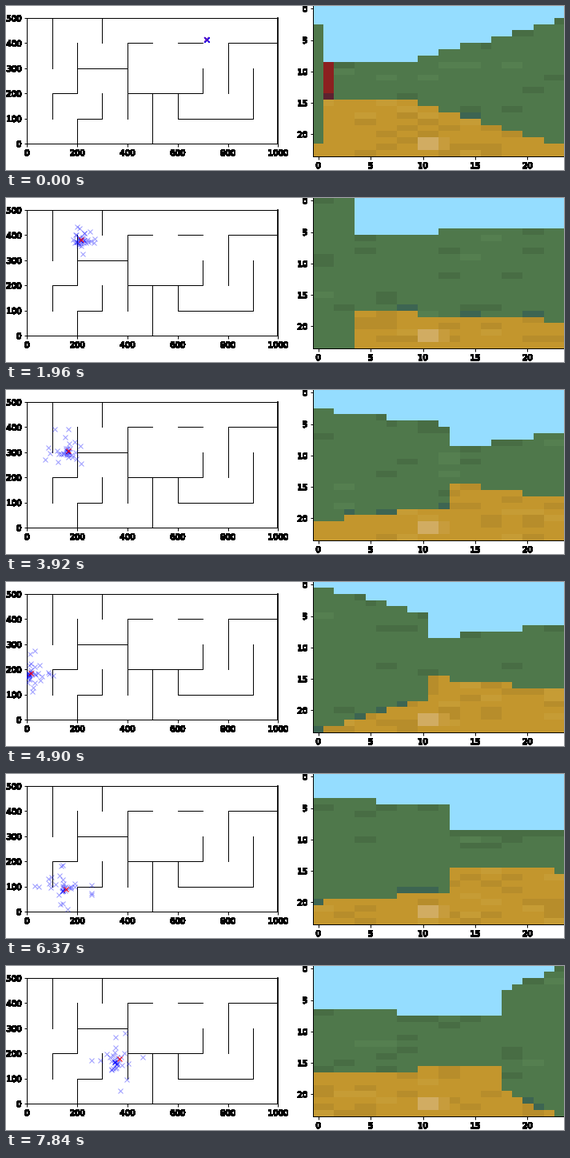
A matplotlib script that plays this animation: 698x205 px, repeating every 8 s.

```python
import numpy as np
import matplotlib.pyplot as plt
from matplotlib.animation import FuncAnimation
from matplotlib.patheffects import withStroke

W, H, DPI = 698, 205, 72
FRAMES, INTERVAL, STEP_MS = 200, 40, 490
STEPS = 17
N = 24  # camera resolution
PARTICLES = 30

SKY, WALL, FLOOR = "#95ddff", "#4f784b", "#c3962d"
WALL_DARK, WALL_LIGHT, TEAL = "#486d44", "#557f50", "#3d6552"
FLOOR_DARK, FLOOR_LIGHT, GLOW = "#b78d2b", "#c69c35", "#d1ac62"
POST, POST_FOOT = "#8c2020", "#5c2230"

# Key poses: step, x, y, column of the wall corner,
# sky height at both ends of the left wall, then of the right wall.
POSES = np.array([
    (0, 714, 414, 8, 10, 10, 9.3, 2.2),
    (4, 215, 381, 4, -2, -2, 6.1, 4.6),
    (6, 137, 442, 15, 3.9, 14.3, 6.3, -6),
    (8, 165, 305, 13, 3.2, 5.6, 9.3, 6.8),
    (10, 16, 186, 11, 0.7, 5.2, 8.95, 7),
    (13, 155, 90, 13, 3.6, 5.45, 9.2, 8.7),
    (16, 368, 177, 18, 7, 8.2, 3.9, 0.2),
])

# Maze walls: start cell corner and unit moves (Up, Down, Left, Right)
ROUTES = [((1, 5), "DD"), ((3, 5), "D"), ((2, 4), "DDLD"), ((2, 3), "RR"),
          ((5, 4), "LDDD"), ((6, 4), "R"), ((4, 2), "RRRU"), ((5, 2), "DD"),
          ((6, 2), "DRRRUU"), ((8, 2), "UURR"), ((2, 0), "URU")]
MOVES = {"U": (0, 1), "D": (0, -1), "L": (-1, 0), "R": (1, 0)}

plt.rcParams.update({
    "font.family": "DejaVu Sans", "font.size": 10, "text.antialiased": False,
    "axes.linewidth": 1, "xtick.major.width": 1, "ytick.major.width": 1,
})


def rgb(color):
    return np.array(plt.matplotlib.colors.to_rgb(color))


def pose_at(step):
    return [np.interp(step, POSES[:, 0], col) for col in POSES[:, 1:].T]


def render_view(corner, left, right, rng):
    """Two walls meeting at a corner column, between sky and floor."""
    sky = np.concatenate([np.linspace(*left, corner),
                          np.linspace(*right, N - corner)])
    sky = np.minimum(sky, 9.4)  # far end of the corridor
    top = np.clip(np.rint(sky), 0, N)
    bottom = np.clip(np.rint(24.2 - sky), 0, N)
    row = np.arange(N)[:, None]
    is_wall = (row >= top) & (row < bottom)
    is_floor = row >= bottom
    grain = np.repeat(rng.random((N, N // 2)), 2, axis=1)

    img = np.tile(rgb(SKY), (N, N, 1))
    layers = [
        (is_wall, WALL),
        (is_wall & (grain < 0.06), WALL_DARK),
        (is_wall & (grain > 0.97), WALL_LIGHT),
        (is_wall & (row == top) & (grain < 0.45), WALL_DARK),
        (is_wall & (row == bottom - 1) & (row > 16) & (grain < 0.35), TEAL),
        (is_floor, FLOOR),
        (is_floor & (grain < 0.2), FLOOR_DARK),
        (is_floor & (grain > 0.9), FLOOR_LIGHT),
    ]
    for mask, color in layers:
        img[mask] = rgb(color)
    img[21:23, 10:12] = rgb(GLOW)
    img[21:23, 12] = 0.7 * rgb(FLOOR) + 0.3 * rgb(GLOW)
    return img


def make_step(k):
    """Robot position, its estimate, the particle cloud and the camera view."""
    rng = np.random.default_rng(40 + k)
    x, y, corner, *heights = pose_at(k)
    drift = 0.07 * k**2
    guess = np.array([max(x - drift, 5), y - 0.6 * drift])
    offsets = rng.laplace(scale=0.7, size=(PARTICLES, 2)).clip(-2.6, 2.6)
    cloud = np.abs(guess + 12 * np.sqrt(k) * offsets)
    view = render_view(round(corner), heights[:2], heights[2:], rng)
    return (x, y), guess, cloud, view


steps = [make_step(k) for k in range(STEPS)]

# The starting view holds a near wall edge and a red post beside it.
first = steps[0][3]
first[3:22, 0] = rgb(WALL)
first[9:14, 1] = rgb(POST)
first[14, 1] = rgb(POST_FOOT)

fig = plt.figure(figsize=(W / DPI, H / DPI), dpi=DPI, facecolor="white")


def pixel_axes(left, top, width, height):
    return fig.add_axes([left / W, 1 - (top + height) / H, width / W, height / H])


def heavy_labels(ax):
    for label in ax.get_xticklabels() + ax.get_yticklabels():
        label.set_path_effects([withStroke(linewidth=0.7, foreground="black")])


maze = pixel_axes(26.25, 15, 314.1, 157)
maze.set(xlim=(0, 1000), ylim=(0, 500),
         xticks=range(0, 1001, 200), yticks=range(0, 501, 100))
maze.spines["right"].set_linewidth(1.8)

for start, moves in ROUTES:
    corners = 100 * np.cumsum([start] + [MOVES[m] for m in moves], axis=0)
    maze.plot(*corners.T, "k", lw=1)


def crosses(color, **kw):
    return maze.plot([], [], "x", color=color, ms=6, mew=1, **kw)[0]


cloud_marks = crosses("blue", alpha=0.4, zorder=3)
guess_mark = crosses("blue", zorder=4)
robot_mark = crosses("red", zorder=5)

camera = pixel_axes(384.1, -0.6, 314.1, 188.4)
picture = camera.imshow(first, aspect="auto", interpolation="nearest")
camera.set(xticks=range(0, 21, 5), yticks=range(0, 21, 5))

heavy_labels(maze)
heavy_labels(camera)


def draw(i):
    k = min((i * INTERVAL + INTERVAL // 2) // STEP_MS, STEPS - 1)
    robot, guess, cloud, view = steps[k]
    cloud_marks.set_data(*cloud.T)
    guess_mark.set_data(*guess[:, None])
    robot_mark.set_data([robot[0]], [robot[1]])
    # All marks coincide at the start and blend to purple.
    robot_mark.set_color("red" if k else "#6010c0")
    robot_mark.set_markeredgewidth(1 if k else 1.5)
    picture.set_data(view)
    return cloud_marks, guess_mark, robot_mark, picture


anim = FuncAnimation(fig, draw, frames=FRAMES, interval=INTERVAL, repeat=True)
plt.show()
```
